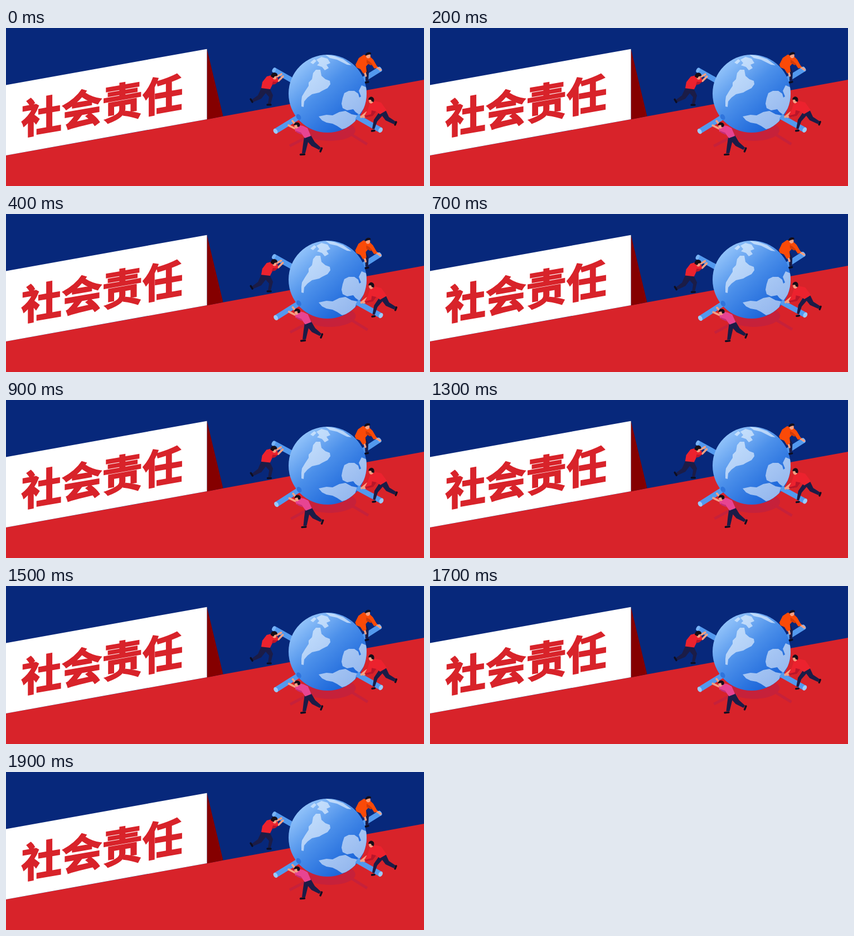
Animation of 750x284 px, one loop 2 s. Source, as an HTML page:

```html
<!DOCTYPE html>
<html lang="zh">
<head>
<meta charset="utf-8">
<title>社会责任</title>
<style>
  html, body { margin: 0; width: 100%; height: 100%; overflow: hidden; background: #07287b; }
  svg { display: block; width: 750px; height: 284px; }
  .title {
    font: 700 72.5px "Noto Sans CJK SC", "Noto Sans CJK", sans-serif;
    fill: #d8232a; stroke: #d8232a; stroke-width: 2;
  }
  .line { fill: none; stroke-linejoin: round; }
  .limb { fill: none; stroke-linecap: round; stroke-linejoin: round; }
  .navy { fill: #1b1c47; }
  .shoe { stroke: #0d0d20; stroke-width: 3.4; }
  .skin { stroke: #f6a083; stroke-width: 3.6; }
  .face { fill: #f6a083; }
  .hair { fill: #160e18; }
  .red { fill: #ec222e; }
  .shade { fill: #b9162a; }
</style>
</head>
<body>
<svg viewBox="0 0 750 284">
  <defs>
    <linearGradient id="sea" x1=".12" y1=".12" x2=".8" y2=".9">
      <stop offset="0" stop-color="#96c6fb"/>
      <stop offset=".45" stop-color="#4c90ea"/>
      <stop offset="1" stop-color="#1762d8"/>
    </linearGradient>
    <linearGradient id="land" gradientUnits="userSpaceOnUse" x1="545" y1="70" x2="630" y2="170">
      <stop offset="0" stop-color="#c3defc"/>
      <stop offset="1" stop-color="#94b7ee"/>
    </linearGradient>
    <clipPath id="disc"><circle cx="577" cy="118" r="70"/></clipPath>
  </defs>

  <path fill="#d8232a" d="M0 229 361 164 750 93V284H0Z"/>
  <path fill="#850000" d="M360.500 37.500 389.500 158.500 360.500 164.500Z"/>
  <path fill="#fff" d="M0 102.500 360.500 37.700V164L0 229Z"/>
  <text class="title" x="27.500" y="196.300" transform="skewY(-9.8)">社会责任</text>

  <g class="turn" fill="#c6213a" stroke="#c6213a">
    <ellipse cx="581" cy="184" rx="46" ry="19" stroke="none"/>
    <path class="line" stroke-width="5" d="M509 212 546 193M608 184 648 209"/>
  </g>

  <g class="turn">
    <path class="line" stroke="#5399ee" stroke-width="9.500" d="M481 75.500 522 99M634 97 671 74"/>
    <ellipse cx="481" cy="75.500" rx="3" ry="4.700" fill="#78b3f6" transform="rotate(30 481 75.500)"/>
    <ellipse cx="671" cy="74" rx="3" ry="4.700" fill="#78b3f6" transform="rotate(-32 671 74)"/>
  </g>

  <circle cx="577" cy="118" r="70" fill="url(#sea)"/>
  <g fill="url(#land)" clip-path="url(#disc)">
    <path d="M551 81 556 75 564 75 566 86 573 92 581 95 582 101 577 108 567 113 562 116 549 119 541 125 535 132 534 142 530 141 530 131 531 123 537 113 543 104 543 98 549 92Z"/>
    <path d="M557 57 566 52 577 55 582 63 575 66 579 72 572 76 567 70 558 67 562 63Z"/>
    <path d="M546 62 553 56 557 59 551 65ZM573 48 588 50 605 56 620 67 612 66 594 57 581 54Z"/>
    <path d="M604 126 607 117 615 113 625 113 632 118 634 125 637 123 633 113 638 103 650 108V130L643 143 634 156 627 151 623 146 612 148 604 144 602 136Z"/>
    <path d="M561 159 575 156 586 157 598 151 609 149 620 155 630 157 626 169 614 179 603 182 594 176 586 172 575 170 567 166Z"/>
  </g>

  <g class="turn">
    <path class="line" stroke="#5399ee" stroke-width="9.500" d="M483.500 185.500 525 160M629 159 672 183.500"/>
    <ellipse cx="525" cy="160" rx="4" ry="5.500" fill="#2f74dc" transform="rotate(-31 525 160)"/>
    <ellipse cx="483.500" cy="185.500" rx="3.500" ry="5" fill="#9ccafb" transform="rotate(-31 483.500 185.500)"/>
    <ellipse cx="672" cy="183.500" rx="3.500" ry="5" fill="#9ccafb" transform="rotate(30 672 183.500)"/>

    <!-- upper left -->
    <path class="limb skin" d="M487 87 494 83M489 95 497 87"/>
    <path class="navy" d="M459 106 473 108 479 121 475 136 470 136 472 124 466 117 458 127 444 133 441 129 452 121Z"/>
    <path class="limb shoe" d="M439 128 442 133M469 138 475 138"/>
    <path class="red" d="M468 87 476 85 488 90 488 97 480 98 474 110 458 108 460 97Z"/>
    <path class="shade" d="M479 96 488 97 483 101 477 102Z"/>
    <ellipse class="face" cx="482" cy="88" rx="3.500" ry="4.500"/>
    <path class="hair" d="M475 87Q476 80 482 80 488 81 487 86L482 87 480 90Z"/>

    <!-- upper right -->
    <path class="navy" d="M634 66 648 72 651 80 650 95 645 95 645 82Z"/>
    <path class="limb shoe" d="M645.500 98 650 97"/>
    <path class="limb skin" d="M655 62 662 69M664 70 672 75M643 77 645.500 86"/>
    <path fill="#fa4a08" d="M627 66 633 54 642 48 653 51 659 57 667 71 661 73 653 61 646 69 647 79 641 82 636 74 629 71Z"/>
    <path fill="#d23a08" d="M647 57 652 60 658 66 654 67 647 63Z"/>
    <ellipse class="face" cx="650" cy="50" rx="4" ry="4.500"/>
    <path class="hair" d="M645 50Q644 45 650 43.500 656 43 655 47L650 48Z"/>

    <!-- lower left -->
    <path class="limb skin" d="M519 181 507 175M521 176 514 167"/>
    <path class="navy" d="M535 196 547 193 554 205 565 215 562 219 548 212 542 205 537 225 531 225 533 209Z"/>
    <path class="limb shoe" d="M528.500 227.500 535.500 227M566.500 216 564 222"/>
    <path fill="#e74492" d="M518 181 523 174 533 176 541 180 547 194 536 198 529 188 519 186Z"/>
    <path fill="#c52d78" d="M519 184 529 188 531 192 522 188Z"/>
    <ellipse class="face" cx="521" cy="176" rx="3.700" ry="4.700"/>
    <path class="hair" d="M516 175Q517 169 523 169.500 529 171 527 177L523 178 522 174Z"/>

    <!-- lower right -->
    <path class="limb skin" d="M647 152 637 160M656 156 641 160"/>
    <path class="navy" d="M669 152 681 147 687 160 699 168 696 173 681 166 675 158 666 168 661 182 657 181 660 165Z"/>
    <path class="limb shoe" d="M656.500 185 661 184.500M700 169 698 174"/>
    <path class="red" d="M653 135 661 131 673 134 683 148 671 155 664 150 655 158 643 158 649 147Z"/>
    <path class="shade" d="M656 148 664 150 658 158 645 161 643 158 655 155Z"/>
    <ellipse class="face" cx="655" cy="131" rx="4" ry="4.700"/>
    <path class="hair" d="M650 129Q651 123.500 656 123.500 662 125 660 133L656 132 655 129Z"/>
  </g>
</svg>
<script>
  const LOOP = 2000, STEP = 100, PEAK = 900, SWING = -1.35;
  const parts = document.querySelectorAll('.turn');

  // Swing out and back with smooth ends, in 100 ms poses.
  function angleAt(time) {
    const t = Math.floor(time % LOOP / STEP) * STEP;
    const p = t < PEAK ? t / PEAK : (LOOP - t) / (LOOP - PEAK);
    return SWING * (1 - Math.cos(Math.PI * p)) / 2;
  }

  const start = performance.now();
  function draw() {
    const angle = angleAt(performance.now() - start);
    for (const part of parts) part.setAttribute('transform', `rotate(${angle} 577 118)`);
    requestAnimationFrame(draw);
  }
  draw();
</script>
</body>
</html>
```
